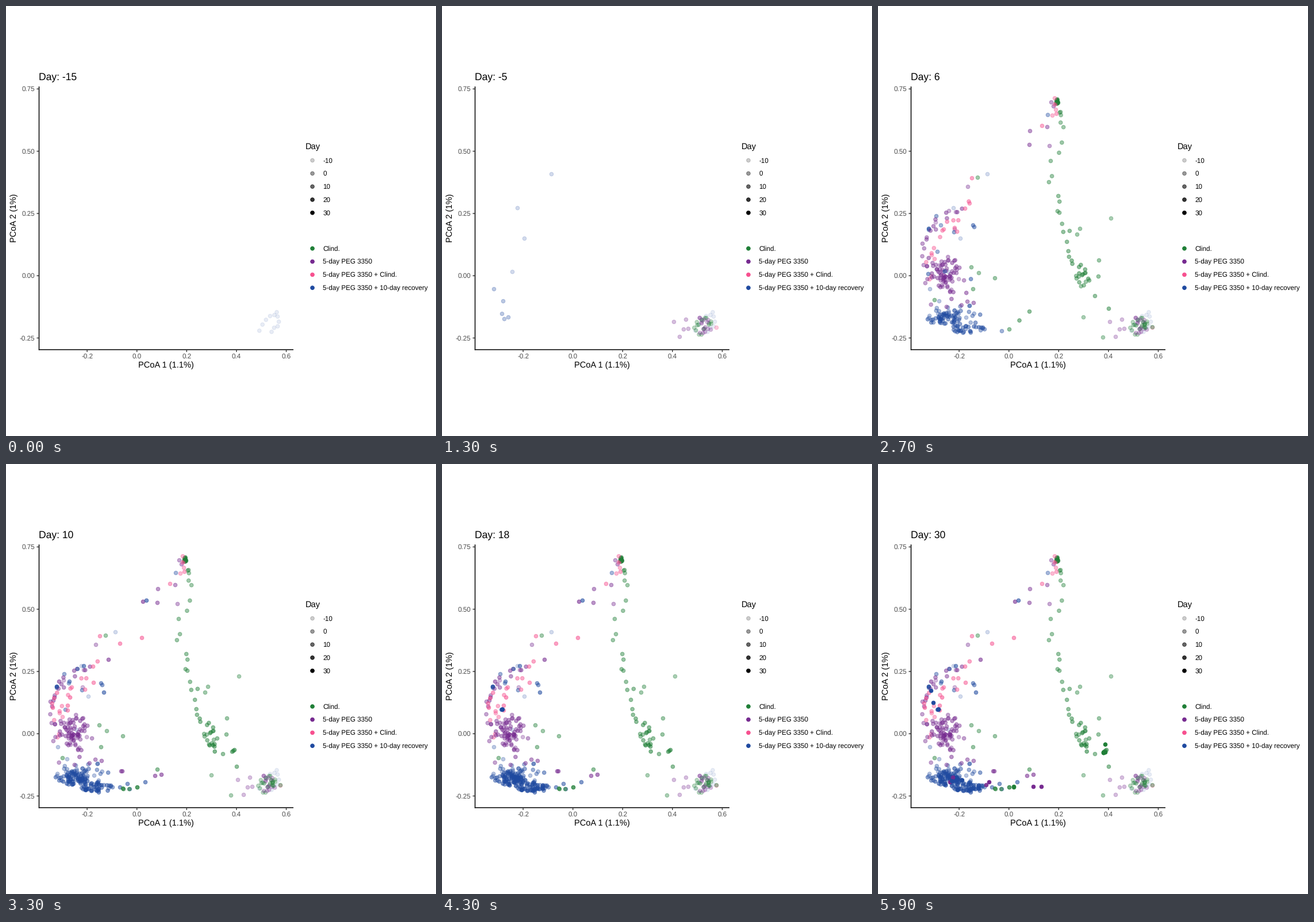
Write a matplotlib script that moves like this. It is 748 px wide and 748 px high and loops after 6 s.

```python
import numpy as np
import matplotlib.pyplot as plt
from matplotlib.animation import FuncAnimation
from matplotlib.colors import to_rgb

SIZE, DPI, FRAMES = 748, 88, 60
FIRST_DAY, LAST_DAY = -15, 30
GREEN, PURPLE, PINK, BLUE = "#1f7f37", "#762a90", "#f7508f", "#1f4aa0"
GROUPS = [
    (GREEN, "Clind."),
    (PURPLE, "5-day PEG 3350"),
    (PINK, "5-day PEG 3350 + Clind."),
    (BLUE, "5-day PEG 3350 + 10-day recovery"),
]
TREATMENT, EARLY, LATE = [-4, -2, -1, 0], [1, 2, 3, 4, 5], [6, 7, 8, 9, 10]
LONGEST_GAP = 5  # points glide only between visits at most this many days apart
PX = 72 / DPI
DOT = dict(s=(6.6 * PX) ** 2, linewidths=0.95 * PX)

plt.rcParams.update({"font.family": "Liberation Sans", "text.hinting": "none"})
rng = np.random.default_rng(12)
tracks = {color: {} for color, _ in GROUPS}


def samples(color, days, points):
    """Share out points, in order, over the days they were sampled."""
    for day, part in zip(days, np.array_split(points, len(days))):
        tracks[color].setdefault(day, []).extend(part)


def cloud(n, cx, cy, rx, ry):
    """Points scattered inside an ellipse."""
    angle = rng.uniform(0, 2 * np.pi, n)
    radius = rng.uniform(0, 1, n) ** 0.55
    return np.column_stack([cx + rx * radius * np.cos(angle),
                            cy + ry * radius * np.sin(angle)])


def trail(n, *stops, jitter=0):
    """Points spaced along a path through the stops."""
    xs, ys = zip(*stops)
    at = np.linspace(0, len(stops) - 1, n)
    nodes = range(len(stops))
    path = np.column_stack([np.interp(at, nodes, xs), np.interp(at, nodes, ys)])
    return path + rng.uniform(-jitter, jitter, (n, 2))


# Baseline: everyone starts in the lower right cluster
samples(BLUE, [-15], trail(11, (441, 563), (455, 542), (472, 532), (475, 553),
                           (461, 565), jitter=1.5))
samples(BLUE, [-10], trail(4, (122, 462), (143, 404), (131, 351), (190, 292)))
samples(BLUE, [-5], trail(5, (90, 492), (106, 513), (104, 535), (108, 544),
                          (115, 541)))
samples(GREEN, [-5], cloud(17, 454, 557, 17, 16))
samples(PURPLE, [-5], cloud(14, 453, 556, 16, 16))
samples(PURPLE, [-5], trail(5, (403, 549), (424, 545), (428, 561), (420, 562),
                            (413, 575)))
samples(PINK, [-5], trail(1, (477, 559)))

# Treatment: the groups leave the cluster
samples(GREEN, [-1], cloud(7, 463, 555, 15, 15))
samples(GREEN, [-1], trail(3, (405, 369), (357, 541), (391, 576)))
samples(GREEN, [0], cloud(13, 311, 166, 2.5, 5))
samples(PINK, [0], trail(4, (309, 169), (309, 180), (303, 190), (93, 433)))
samples(PURPLE, TREATMENT, cloud(11, 117, 468, 24, 28))
samples(PURPLE, TREATMENT, trail(6, (100, 376), (133, 388), (123, 356),
                                 (135, 358), (156, 314), (298, 243)))
samples(BLUE, TREATMENT, cloud(22, 112, 537, 30, 15))
samples(BLUE, TREATMENT, cloud(6, 150, 538, 20, 20))
samples(BLUE, [0], trail(4, (88, 387), (88, 389), (109, 381), (295, 189)))

# Early response
samples(GREEN, [1], cloud(6, 311, 167, 2, 4))
samples(GREEN, EARLY, trail(24, (314, 181), (320, 206), (300, 290), (311, 350),
                            (325, 390), (335, 432), (352, 455), jitter=7))
samples(GREEN, EARLY, cloud(13, 355, 471, 13, 17))
samples(GREEN, EARLY, trail(6, (346, 397), (351, 387), (384, 442), (383, 470),
                            (377, 504), (401, 526)))
samples(GREEN, EARLY, trail(8, (173, 298), (175, 464), (162, 454), (203, 473),
                            (165, 492), (98, 511), (228, 562), (263, 531)))
samples(PURPLE, EARLY, trail(5, (301, 167), (305, 174), (294, 210), (264, 217),
                             (263, 241)))
samples(PURPLE, EARLY, cloud(36, 116, 462, 23, 25))
samples(PURPLE, EARLY, cloud(28, 114, 475, 36, 42))
samples(PURPLE, EARLY, trail(15, (79, 455), (83, 410), (99, 376), (141, 355),
                             jitter=6))
samples(PURPLE, EARLY, trail(5, (91, 521), (141, 520), (165, 514), jitter=4))
samples(PINK, EARLY, trail(5, (307, 160), (307, 171), (310, 187), (285, 208),
                           (163, 299)))
samples(PINK, EARLY, trail(14, (86, 473), (92, 433), (105, 400), (137, 378),
                           (160, 345), jitter=9))
samples(BLUE, EARLY, trail(6, (103, 427), (88, 387), (101, 365), (132, 393),
                           (167, 384), (165, 381)))
samples(BLUE, EARLY, cloud(34, 114, 544, 30, 9))
samples(BLUE, EARLY, cloud(26, 155, 562, 32, 7))
samples(BLUE, EARLY, cloud(7, 158, 535, 24, 16))
samples(BLUE, EARLY, trail(1, (215, 565)))

# Late response
samples(GREEN, LATE, cloud(5, 360, 488, 14, 16))
samples(GREEN, LATE, trail(4, (228, 562), (214, 565), (204, 565), (203, 564)))
samples(GREEN, LATE, trail(3, (393, 500), (397, 497)))
samples(PURPLE, LATE, trail(5, (82, 411), (92, 378), (125, 471), (178, 340),
                            (238, 239)))
samples(PURPLE, LATE, trail(4, (200, 534), (202, 534), (259, 542), (270, 540)))
samples(PINK, LATE, cloud(7, 95, 412, 17, 26))
samples(PINK, LATE, trail(3, (152, 380), (198, 312), (236, 302)))
samples(BLUE, LATE, trail(6, (88, 387), (110, 378), (124, 356), (135, 351),
                          (170, 397), (244, 237)))
samples(BLUE, LATE, cloud(32, 121, 549, 23, 10))
samples(BLUE, LATE, cloud(22, 160, 562, 28, 9))
samples(BLUE, LATE, trail(3, (198, 562), (211, 556), (242, 553)))

# Follow-up
samples(BLUE, [15], cloud(12, 127, 551, 18, 9))
samples(BLUE, [15], cloud(8, 170, 564, 22, 5))
samples(BLUE, [15, 20], cloud(4, 105, 426.5, 1.5, 0.5))
samples(BLUE, [20], cloud(4, 130, 551, 16, 7))
samples(BLUE, [30], trail(2, (92, 394), (96, 415)))
samples(BLUE, [30], cloud(3, 138, 549, 16, 4))
samples(GREEN, [25, 30], trail(2, (236, 562), (236, 561)))
samples(GREEN, [25, 30], cloud(5, 393, 501.5, 3, 1))
samples(GREEN, [30], trail(1, (395, 487.5)))
samples(PURPLE, [25, 30], trail(6, (125, 553), (130, 545), (188, 558),
                                (193, 553), (270, 561), (284, 561)))


def frame_of(day):
    return round((day - FIRST_DAY) / (LAST_DAY - FIRST_DAY) * (FRAMES - 1))


def alpha_of(day):
    return 0.1 + 0.9 * (day - FIRST_DAY) / (LAST_DAY - FIRST_DAY)


def by_x(points):
    return sorted(points, key=lambda p: p[0])


def visible(frame):
    """Positions and colours: samples already passed, then those on the move."""
    passed, moving = [], []
    for color, track in tracks.items():
        rgb = to_rgb(color)
        days = sorted(track)
        for day in days:
            if frame_of(day) <= frame:
                passed += [(day, p, (*rgb, alpha_of(day))) for p in track[day]]
        for a, b in zip(days, days[1:]):
            start, end = frame_of(a), frame_of(b)
            if b - a <= LONGEST_GAP and start < frame < end:
                t = (frame - start) / (end - start)
                rgba = (*rgb, alpha_of(a + (b - a) * t))
                moving += [(b, p + (q - p) * t, rgba)
                           for p, q in zip(by_x(track[a]), by_x(track[b]))]
    passed.sort(key=lambda dot: dot[0])
    _, places, colors = zip(*passed, *moving)
    return np.array(places), colors


fig = plt.figure(figsize=(SIZE / DPI, SIZE / DPI), dpi=DPI, facecolor="white")
ax = fig.add_axes([0, 0, 1, 1])
ax.set(xlim=(-0.5, SIZE - 0.5), ylim=(SIZE - 0.5, -0.5))  # whole numbers are pixel centres
ax.axis("off")


def label(x, y, text, px, color="black", **kw):
    return ax.text(x, y, text, fontsize=px * PX, color=color, va="baseline", **kw)


def line(xs, ys, color="black"):
    ax.plot(xs, ys, color=color, lw=1.5 * PX, solid_capstyle="butt", snap=False)


line([57, 57], [139.5, 598])
line([56.3, 499.5], [597.3, 597.3])
for i, value in enumerate(["0.75", "0.50", "0.25", "0.00", "-0.25"]):
    y = 143.8 + 108.3 * i
    line([53, 56.3], [y, y], "#333333")
    label(50, y + 4, value, 11.65, "#4d4d4d", ha="right")
for i, value in enumerate(["-0.2", "0.0", "0.2", "0.4", "0.6"]):
    x = 140.6 + 86.6 * i
    line([x, x], [598, 601.3], "#333333")
    label(x, 612, value, 11.65, "#4d4d4d", ha="center")
label(278.2, 628.7, "PCoA 1 (1.1%)", 14.6, ha="center")
label(17.7, 368.3, "PCoA 2 (1%)", 14.6, ha="center", rotation=90,
      rotation_mode="anchor")

label(520.3, 248, "Day", 14.6)
keys = [(268 + 22.8 * i, (0, 0, 0, alpha_of(day)), str(day))
        for i, day in enumerate([-10, 0, 10, 20, 30])]
keys += [(421.3 + 22.8 * i, (*to_rgb(color), 1), name)
         for i, (color, name) in enumerate(GROUPS)]
heights, shades, names = zip(*keys)
ax.scatter([532.5] * len(keys), heights, facecolors=shades, edgecolors=shades, **DOT)
for y, name in zip(heights, names):
    label(550.8, y + 4, name, 11.65)

title = label(56.8, 129, "", 17.5)
dots = ax.scatter([], [], **DOT)


def draw(frame):
    day = FIRST_DAY + (LAST_DAY - FIRST_DAY) * frame / (FRAMES - 1)
    title.set_text(f"Day: {round(day)}")
    places, colors = visible(frame)
    dots.set_offsets(places)
    dots.set_facecolor(colors)
    dots.set_edgecolor(colors)
    return title, dots


anim = FuncAnimation(fig, draw, frames=FRAMES, interval=100, repeat=True,
                     repeat_delay=0)
plt.show()
```
